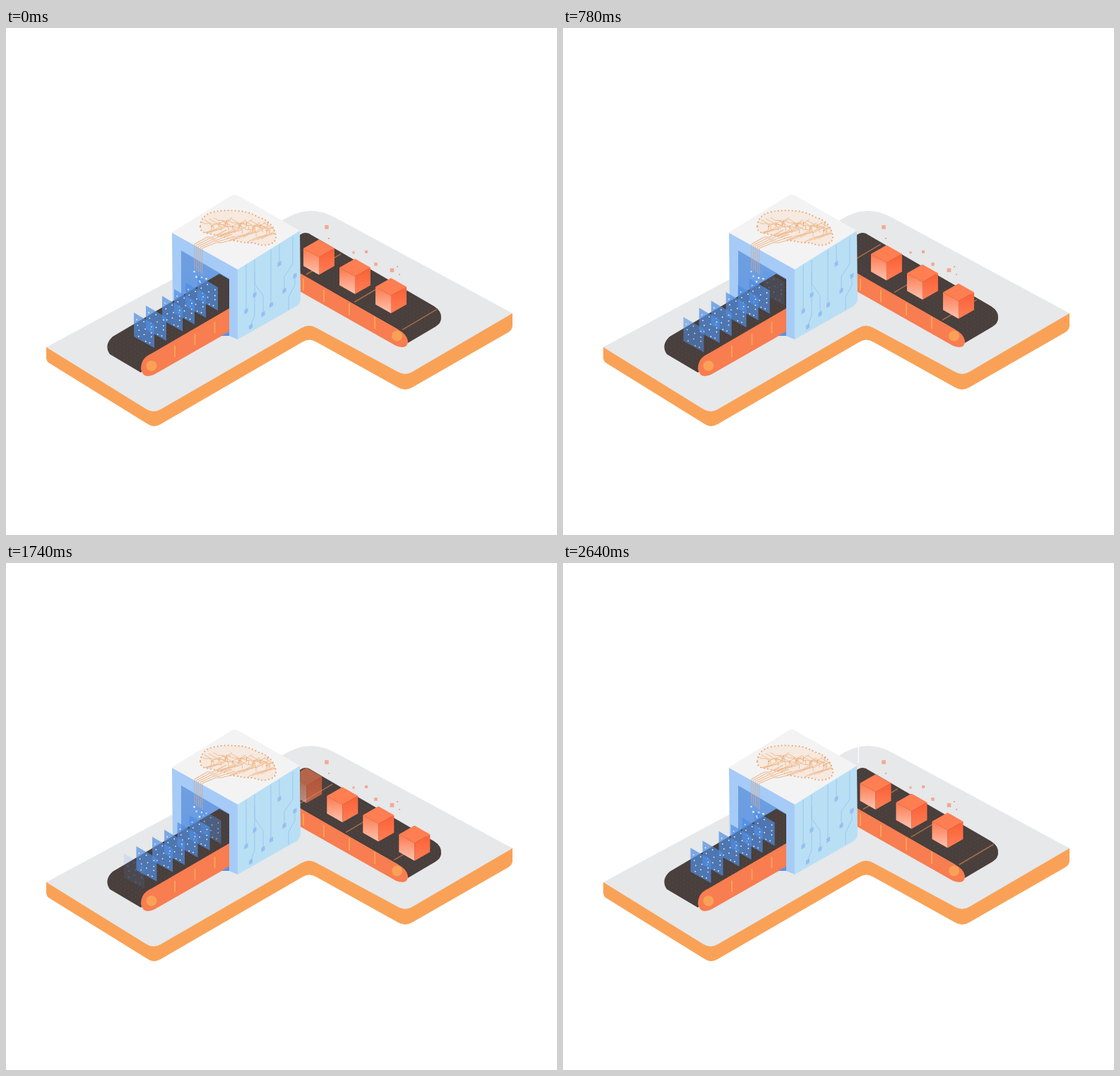
An HTML page with a canvas that plays this animation: 780 by 718 pixels, repeating every 2.67 s.

```html
<!DOCTYPE html>
<html lang="en">
<head>
<meta charset="utf-8">
<style>
html, body { margin: 0; width: 100%; height: 100%; overflow: hidden; background: #fff; }
canvas { display: block; }
</style>
</head>
<body>
<canvas width="780" height="718"></canvas>
<script>
const ctx = document.querySelector('canvas').getContext('2d');
const LOOP = 2670;
const ORANGE = '#f9a257', DARK = '#493f3c', CORAL = '#f87d50';

const clamp = v => Math.max(0, Math.min(1, v));
const ramp = (t, from, to) => clamp((t - from) / (to - from));
const lerp = (a, b, u) => a + (b - a) * u;

function fill(d, color) {
  ctx.fillStyle = color;
  ctx.fill(new Path2D(d));
}
function stroke(d, color, width = 1) {
  ctx.strokeStyle = color;
  ctx.lineWidth = width;
  ctx.stroke(new Path2D(d));
}
function dot(x, y, r, color) {
  ctx.fillStyle = color;
  ctx.beginPath();
  ctx.arc(x, y, r, 0, Math.PI * 2);
  ctx.fill();
}
function square(x, y, size, color) {
  ctx.fillStyle = color;
  ctx.fillRect(x - size / 2, y - size / 2, size, size);
}
function clipped(d, draw) {
  ctx.save();
  ctx.clip(new Path2D(d));
  draw();
  ctx.restore();
}
function gradient(y0, y1, top, bottom) {
  const g = ctx.createLinearGradient(0, y0, 0, y1);
  g.addColorStop(0, top);
  g.addColorStop(1, bottom);
  return g;
}
function randomizer(seed) {
  return () => (seed = seed * 16807 % 2147483647) / 2147483647;
}

function platform() {
  fill('M57 452V467Q57 472 62 475L200 560.5Q209 567 219 561L419 445Q429 438 440 445L555 509Q565 515 575 509L711 431Q717 427 717 422V404L430 330Z', ORANGE);
  fill('M57 452L392 272Q428 248 465 268L717 404L575 487Q565 493 555 487L440 425Q429 418 418 425L219 540Q209 546 199 540Z', '#e6e8ea');
}

// Faint dots that travel along a belt.
function beltTexture(x0, y0, sideX, slopeY, shift) {
  for (let i = -10; i < 40; i++) {
    for (let j = 0; j < 10; j++) {
      const a = i * 6 + shift, b = j * 6;
      square(x0 + a * .866 + b * sideX, y0 + a * slopeY + b * .5, 1, 'rgba(255,235,225,.11)');
    }
  }
}
function ticks(list, height) {
  for (const [x, y] of list) stroke(`M${x} ${y}v${height}`, ORANGE, 2);
}

const RIGHT_BELT = 'M416 293Q424 287 433 293.5L606 394Q617 401 616 411Q616 418 608 423L569 446L555 427L416 348Z';

function rightBelt(t, p) {
  fill(RIGHT_BELT, DARK);
  clipped(RIGHT_BELT, () => {
    beltTexture(427, 291, -.866, .5, p * 60);
    // Alternate stripes hand over to each other as a loop begins.
    const arrive = ramp(t, 0, 300);
    for (let k = -1; k < 5; k++) {
      const s = 34 * (k + p);
      ctx.globalAlpha = k % 2 ? arrive : 1 - arrive;
      stroke(`M${425 + s} ${349 + s * .577}l49 -29`, '#a66c4b', 1.5);
    }
  });
  fill('M416 347L555 427Q567 433 569 443Q569 452 561 452Q557 452 552 450L416 373Z', CORAL);
  ticks([[421, 355], [450, 371], [486, 390], [522, 409]], 17);
  dot(553.5, 436, 7.5, ORANGE);
}

function cube(x, y, alpha) {
  ctx.save();
  ctx.globalAlpha = alpha;
  ctx.translate(x, y);
  fill('M0 0L22 12.5L0 25L-22 12.5Z', '#ff7e52');
  fill('M-22 12.5L0 25V50L-22 37.5Z', gradient(16, 48, '#ff7f56', '#fdc0ab'));
  fill('M22 12.5L0 25V50L22 37.5Z', gradient(16, 48, '#fb6238', '#ff7d55'));
  ctx.restore();
}

function cubes(t, p) {
  clipped('M416.5 200H700V500H416.5Z', () => {
    for (let k = -1; k < 3; k++) {
      const alpha = k < 0 ? ramp(t, 1380, 1980) : k > 1 ? 1 - ramp(t, 2010, 2550) : 1;
      cube(443 + 51 * (k + p), 299.5 + 27.2 * (k + p), alpha);
    }
  });
  for (const [x, y, s] of [[454, 282, 5.5], [457, 298, 2], [492, 318, 3], [510, 317, 4],
    [523.5, 334.5, 4.5], [546.5, 343, 5.5], [554, 338, 2], [557, 349, 2]]) {
    square(x, y, s, '#f4a791');
  }
}

function box() {
  fill('M235 290L328 341V441L316 436L236 395Z', '#a5cbf6');
  fill('M328 341L416 287L417 383Q417 390 411 394L328 441Z', '#b9dff5');
  fill('M237 288L318 238Q324 234 330 238L416 287L328 342L237 291Q234 289.5 237 288Z', '#f3f3f4');
  fill('M248 315L316 355V436L248 396Z', gradient(315, 436, '#6f9fe0', '#6398e6'));
  stroke('M340 335V399M352 328V377M352 345V362L364 379V405M352 377V407L346 422M375 314V391M387 307V333M406 296V334L394 352V372M409 350V364L400 381V399',
    '#9bc7ee', 1);
  for (const [x, y] of [[340, 401], [352, 378], [346.5, 423], [364, 405], [375.5, 392], [387, 334], [394, 372], [409, 351]]) {
    fill(`M${x - 2.5} ${y - 1.5}l5 -3v6l-5 3Z`, '#94bff0');
  }
}

const BRAIN = 'M275 280Q276 266 292 261Q309 257 326 259Q343 259 357 268Q376 273 381 290Q385 302 374 306Q363 310 350 304Q337 305 325 301Q315 302 313 297L287 291Q274 290 275 280Z';

function brain() {
  const line = '#efb88b';
  fill(BRAIN, 'rgba(250,217,190,.4)');
  clipped(BRAIN, () => {
    ctx.lineJoin = 'round';
    // Traces leave the stem, bend upwards and end in small nodes.
    for (let k = 0; k < 16; k++) {
      const x = 278 + k * 6.5, y = 291 - k % 4 * 2 + k * .5;
      const reach = 7 + k % 3 * 4;
      stroke(`M${x - 14} ${y + 6}l14 -7h6l${reach} ${-reach * .57}v-5l8 -5`, line, .9);
      stroke(`M${x - 4} ${y - 18}l${reach} ${reach * .57}h7l6 4v5`, line, .9);
      dot(x + 6 + reach, y - 6 - reach * .57, 1, '#eda263');
    }
  });
  ctx.save();
  ctx.lineCap = 'round';
  ctx.setLineDash([0, 5]);
  stroke(BRAIN, '#eaa66d', 2.1);
  ctx.restore();
  for (let k = 0; k < 5; k++) {
    const x = 267 + k * 2.7;
    stroke(`M${x} ${306 + k * 1.5}L${285 + k * 3} ${296 + k * 2}h8L${312 + k * 4} ${286 + k * 3}`, line, 1.2);
    stroke(`M${x} ${306 + k * 1.5}V${341 + k * 2}`, 'rgba(211,172,148,.75)', 1.1);
  }
}

const LEFT_BELT = 'M191 488L147 462Q138 449 151 437L302 348L316 356V400L207 466Z';

function leftBelt(p) {
  fill(LEFT_BELT, DARK);
  clipped(LEFT_BELT, () => beltTexture(146, 440, .866, -.5, p * 48));
  fill('M316 397L206 461Q191 467 191 483Q193 493 201 493Q206 493 211 490L316 430Z', CORAL);
  fill('M304 436L316 430V436Z', '#5f91e0');
  ticks([[239, 450], [267.5, 433], [295.5, 416]], 16);
  dot(206, 478.5, 7.5, ORANGE);
}

const specks = (() => {
  const random = randomizer(7);
  return Array.from({ length: 12 }, (_, i) => [4 + i % 3 * 9 + random() * 4, 4 + Math.floor(i / 3) * 8 + random() * 4]);
})();

function sheet(right, alpha) {
  if (alpha <= 0) return;
  ctx.save();
  ctx.globalAlpha = alpha;
  ctx.translate(right - 29, 403 - .585 * (right - 210));
  fill('M0 0L29 17V50L0 34Z', 'rgba(80,141,226,.7)');
  for (const [x, y] of specks) dot(x, y + x * .57, .9, '#eaf2ff');
  ctx.restore();
}

function sheets(t, p) {
  // Right edges at whole loops of age, for the two alternating rows.
  const rowA = [170, 210, 250, 283, 316], rowB = [188, 227, 267, 300, 345];
  const at = (row, k) => lerp(row[k], row[k + 1], p);
  clipped('M0 0H316V718H0Z', () => {
    for (let k = 3; k >= 0; k--) {
      sheet(at(rowB, k), k === 3 ? 1 - ramp(t, 90, 960) : k ? 1 : ramp(t, 270, 900));
      sheet(at(rowA, k), k === 3 ? 1 - ramp(t, 1200, 2500) : k ? 1 : ramp(t, 1590, 2400));
    }
  });
}

function fallingBits(p) {
  for (const [x, y, phase] of [[266.5, 345, 0], [269.5, 352, .3], [277, 353.5, .6], [274, 359, .8], [283.5, 355, .45]]) {
    const wave = Math.sin((p * 2 + phase) * Math.PI * 2);
    ctx.globalAlpha = .8 + .2 * wave;
    square(x, y + wave * .5, 2.3, '#fff');
  }
  ctx.globalAlpha = 1;
}

function glints(t) {
  const full = t >= 960 && t < 1290 || t >= 2040 && t < 2460;
  if (full) {
    stroke('M418.2 260V305', '#fff', 1.6);
    stroke('M328.5 237V248', '#fff', 1.2);
  } else if (t >= 2460) {
    stroke('M418.2 260V283', '#fff', 1.2);
  }
}

function frame(now) {
  const t = now % LOOP, p = t / LOOP;
  ctx.clearRect(0, 0, 780, 718);
  platform();
  rightBelt(t, p);
  cubes(t, p);
  box();
  leftBelt(p);
  sheets(t, p);
  brain();
  fallingBits(p);
  glints(t);
  requestAnimationFrame(() => frame(performance.now()));
}
frame(0);
</script>
</body>
</html>
```
